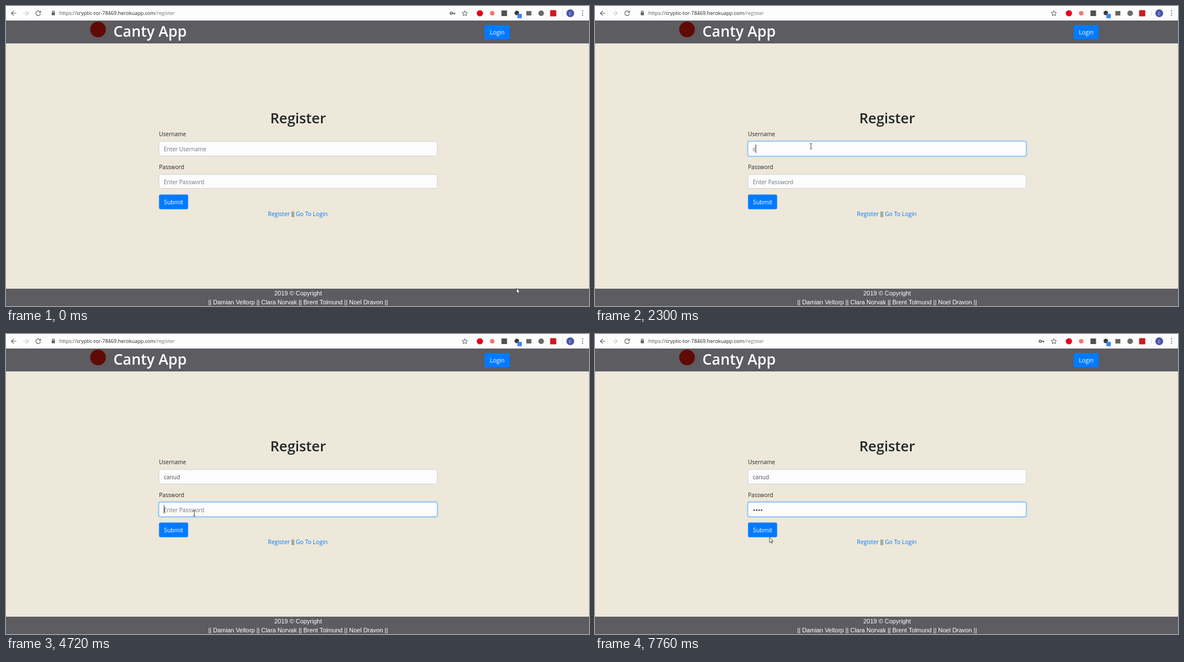
These frames come from a looping animation (1042x537 px, 8 s). An HTML page:

```html
<!DOCTYPE html>
<html lang="en">
<head>
<meta charset="utf-8">
<title>Register</title>
<style>
html, body { margin: 0; width: 100%; height: 100%; overflow: hidden; }
svg { display: block; width: 100vw; height: 100vh; }
text { font: 10px "Open Sans", "Noto Sans", sans-serif; fill: #212529; white-space: pre; }
.title { font-size: 25.3px; font-weight: 600; }
.brand { font-size: 26.5px; font-weight: 600; fill: #fff; }
.url { font-size: 9px; }
.link { font-size: 10.4px; fill: #007bff; }
.button { font-size: 10.4px; fill: #fff; }
.hint { fill: #6c757d; }
.typed { font-size: 10.2px; fill: #495057; }
.foot { font: 10.9px "Liberation Sans", Arial, sans-serif; fill: #fff; }
.bars { font: 10.4px "Liberation Sans", Arial, sans-serif; }
.mid { text-anchor: middle; }
.field { fill: #fcfcfd; stroke: #ced4da; }
.icon { fill: none; stroke: #5a5d61; stroke-width: 1.2; }
#list text { font-size: 8.25px; font-weight: 600; }
#list rect { filter: drop-shadow(0 1px 1.2px rgba(0, 0, 0, .35)); }
</style>
</head>
<body>
<svg viewBox="0 0 1042 537" preserveAspectRatio="none">
  <rect width="1042" height="537" fill="#ede8d9"/>

  <!-- browser bar -->
  <rect width="1042" height="26" fill="#fdfdfd"/>
  <g class="icon">
    <path d="M18.5 13H10M13.8 8.8L9.6 13l4.2 4.2"/>
    <path d="M31 13h8.5M35.7 8.8l4.2 4.2l-4.2 4.2" stroke="#c4c6c9"/>
    <path d="M60.8 10.2A4.2 4.2 0 1 0 61.6 14.2M61.8 8.5v3.2h-3.3"/>
    <path d="M82.8 12v-1.4a1.8 1.8 0 0 1 3.6 0V12"/>
    <path d="M820 8.3l1.4 3.2l3.4.3l-2.6 2.2l.8 3.4l-3-1.8l-3 1.8l.8-3.4l-2.6-2.2l3.4-.3z" stroke-width="1"/>
  </g>
  <rect x="81.8" y="11.6" width="5.6" height="5" rx=".7" fill="#5a5d61"/>
  <text class="url" x="95.5" y="16.2"><tspan fill="#4d5156">https://</tspan>cryptic-tor-78469.herokuapp.com<tspan fill="#70757a">/register</tspan></text>
  <g id="key" fill="none" stroke="#5a5d61" stroke-width="1.6">
    <circle cx="795.8" cy="13" r="2"/>
    <path d="M798 13h5M801.5 13v2.4"/>
  </g>
  <circle cx="847" cy="13" r="5.6" fill="#e60023"/>
  <circle cx="869" cy="13" r="4" fill="#fb7468"/>
  <rect x="885.5" y="8" width="10" height="10" fill="#505050"/>
  <circle cx="913" cy="12.5" r="4" fill="#3c3c3c"/>
  <rect x="914" y="14" width="8" height="8" rx="1" fill="#4285f4"/>
  <rect x="930" y="9" width="9" height="8" fill="#666"/>
  <circle cx="956.5" cy="13" r="5" fill="#6a6a6a"/>
  <rect x="972.5" y="7.5" width="11" height="11" rx="1" fill="#cf1820"/>
  <path d="M994.5 8v10" stroke="#dadce0"/>
  <circle cx="1008.5" cy="13" r="7" fill="#4b56ad"/>
  <text class="mid" x="1008.5" y="15.6" style="font-size:7px;fill:#fff">C</text>
  <path d="M1030.5 9v.01M1030.5 13v.01M1030.5 17v.01" stroke="#5a5d61" stroke-width="2" stroke-linecap="round"/>

  <!-- page header and footer -->
  <path d="M0 26H1042V67H0zM0 506H1042V537H0z" fill="#5d5c61"/>
  <circle cx="164.5" cy="42" r="14" fill="#5f0a05"/>
  <text class="brand" x="192" y="54.5">Canty App</text>
  <rect x="855.5" y="34" width="45" height="25.5" rx="2.7" fill="#007bff"/>
  <text class="button mid" x="878" y="51">Login</text>
  <text class="foot mid" x="522" y="517.6">2019 © Copyright</text>
  <text class="foot mid" x="522" y="534.2">|| Damian Veltorp || Clara Norvak || Brent Tolmund || Noel Dravon ||</text>

  <!-- form -->
  <text class="title mid" x="522" y="209.5">Register</text>
  <text x="273.5" y="233">Username</text>
  <text x="273.5" y="291.7">Password</text>
  <rect class="field" x="273.5" y="242.5" width="497" height="26" rx="2.7"/>
  <rect class="field" x="273.5" y="301.5" width="497" height="25" rx="2.7"/>
  <g id="ring" fill="none">
    <rect x="272.6" y="241.6" width="498.8" height="27.8" rx="3.4" stroke="#b3d3f3" stroke-width="2.4"/>
    <rect x="273.5" y="242.5" width="497" height="26" rx="2.7" stroke="#8fc2fb"/>
  </g>
  <text class="hint" id="userHint" x="282" y="259.8">Enter Username</text>
  <text class="hint" id="passHint" x="282" y="318.6">Enter Password</text>
  <text class="typed" id="user" x="282" y="259.8"></text>
  <path id="spelling" d="M282 261.6h30" stroke="#d8404a" stroke-width="1"/>
  <g id="dots" fill="#3d4349"></g>
  <rect id="submit" x="273.5" y="337.5" width="52" height="26.3" rx="2.7"/>
  <text class="button mid" x="299.5" y="354.8">Submit</text>
  <text class="link" x="468" y="376.4">Register</text>
  <text class="bars" x="510" y="376.4">||</text>
  <text class="link" x="518" y="376.4">Go To Login</text>

  <g id="list">
    <rect x="273" y="269" width="139.5" height="158" rx="1.5" fill="#fff"/>
  </g>
  <rect id="caret" width="1" height="15" fill="#333"/>

  <!-- pointer -->
  <g id="pointer">
    <circle id="press" r="8" fill="#f7e420" opacity=".75"/>
    <path id="arrow" d="M0 0V9.3L2.1 7.4L3.6 10.6L5 10L3.6 6.9H6.5Z" fill="#fff" stroke="#222" stroke-width=".8"/>
    <path id="beam" d="M-2-4.8h1.4L0-4.3L.6-4.8H2M0-4.3V4.3M-2 4.8h1.4L0 4.3L.6 4.8H2" fill="none" stroke="#333" stroke-width=".9"/>
    <path id="hand" d="M-1 .5Q0-.6 1 .5V4l4 1v3L4 11H0L-3.4 6.6Q-3 5-1 6.5Z" fill="#fff" stroke="#222" stroke-width=".8"/>
  </g>
</svg>
<script>
const $ = id => document.getElementById(id);
const show = (id, on) => $(id).style.visibility = on ? 'visible' : 'hidden';

function add(parent, tag, attrs, text = '') {
  const node = document.createElementNS('http://www.w3.org/2000/svg', tag);
  for (const name in attrs) node.setAttribute(name, attrs[name]);
  node.textContent = text;
  return $(parent).appendChild(node);
}

['norvak4481@example.com', 'cnorvak', 'tadom@example.com',
 'thelarkspurhut@example.com', 'nettiec', 'pnorv0052']
  .forEach((name, i) => add('list', 'text', { x: 281, y: 289.2 + 24.5 * i }, name));

const DOT = 4.4;
const dots = [0, 1, 2, 3].map(i =>
  add('dots', 'circle', { cx: 284.4 + DOT * i, cy: 315.3, r: 1.4 }));

const LOOP = 8000;
const NAME = 'canud';
const nameKeys = [2300, 2550, 2700, 2780, 3250];
const passKeys = [5820, 6110, 6820, 6970];
const caretOn = [[690, 1140], [1690, 2150], [2300, 3800], [4330, 5100],
                 [5650, 6660], [6820, 7520]];
const moves = [
  [0, 912.5, 505, 'arrow'], [70, 640, 372, 'arrow'], [140, 391, 257, 'beam'],
  [290, 389, 254, 'beam'], [370, 387, 252, 'beam'], [450, 386, 251, 'beam'],
  [3950, 381, 262, 'beam'], [4030, 370, 279, 'arrow'], [4100, 356, 296, 'arrow'],
  [4180, 346, 316, 'beam'], [4250, 340, 330, 'arrow'], [4330, 339, 331, 'arrow'],
  [4400, 338, 325, 'beam'], [4480, 336.5, 321, 'beam'], [7520, 332, 329, 'arrow'],
  [7600, 322, 345, 'hand'], [7680, 316, 356, 'hand'], [7760, 312, 364, 'arrow']
];

function draw(t) {
  const within = (from, to) => t >= from && t < to;
  const count = times => times.filter(time => t >= time).length;
  const letters = count(nameKeys), typedDots = count(passKeys);

  show('key', !within(2300, 5890));
  show('list', within(690, 2300));
  show('ring', t >= 770);
  $('ring').setAttribute('transform', t < 4720 ? '' : 'translate(0 58.5)');

  $('user').textContent = NAME.slice(0, letters);
  show('userHint', !letters);
  show('passHint', !typedDots);
  show('spelling', within(3950, 4640));
  dots.forEach((dot, i) => dot.style.visibility = i < typedDots ? 'visible' : 'hidden');

  const inPass = t >= 4640;
  const offset = inPass ? typedDots * DOT : letters && $('user').getComputedTextLength();
  $('caret').setAttribute('x', Math.round(282 + offset));
  $('caret').setAttribute('y', inPass ? 306.5 : 248);
  show('caret', caretOn.some(span => within(...span)));

  const [, x, y, shape] = moves.findLast(move => t >= move[0]);
  $('pointer').setAttribute('transform', `translate(${x} ${y})`);
  for (const id of ['arrow', 'beam', 'hand']) show(id, id === shape);
  show('press', within(600, 690) || within(4550, 4640));
  $('submit').setAttribute('fill', shape === 'hand' ? '#0069d9' : '#007bff');
}

function tick() {
  draw(performance.now() % LOOP);
  requestAnimationFrame(tick);
}
tick();
</script>
</body>
</html>
```
